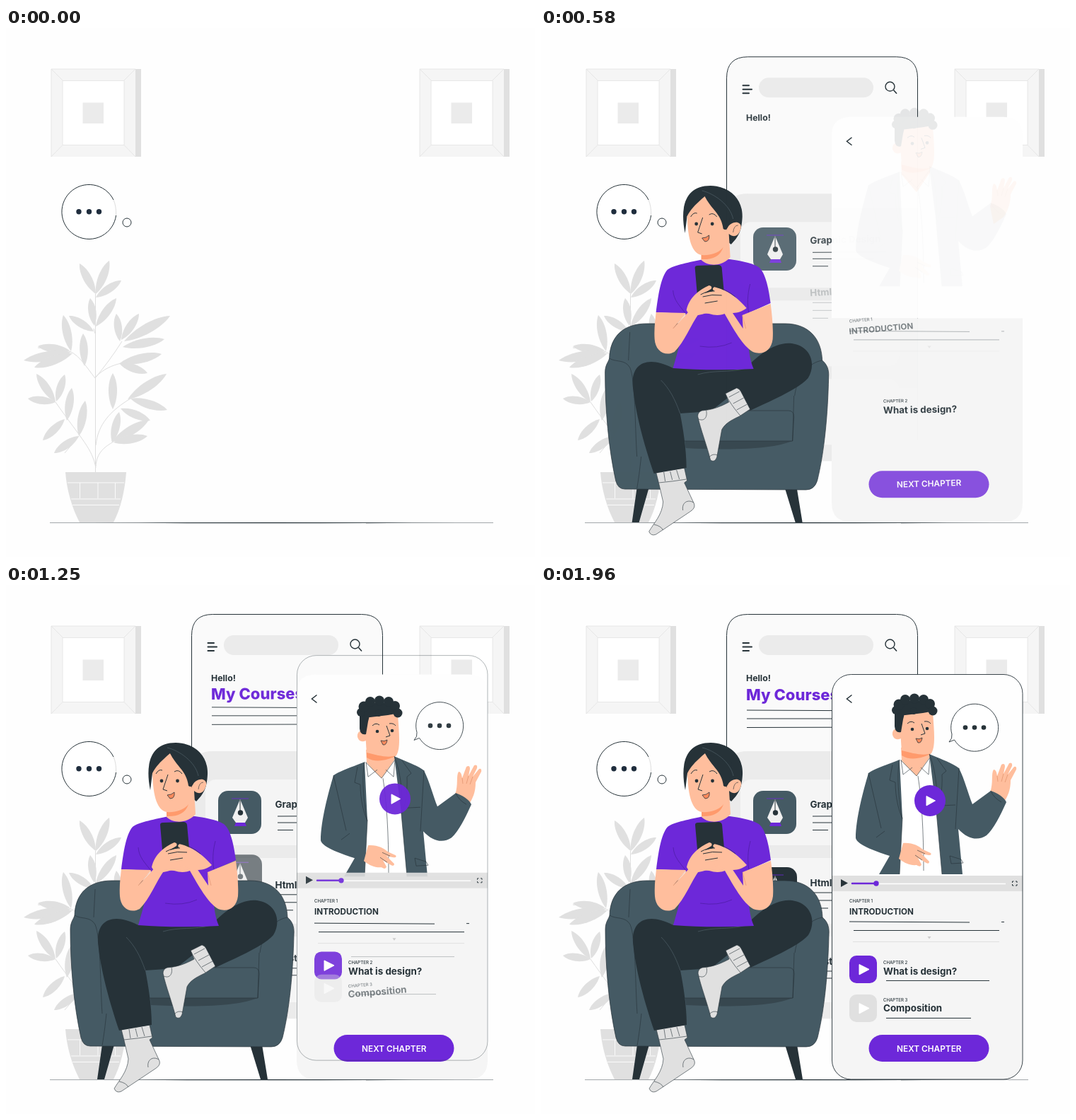
Recreate the animation shown at these times as an HTML page. Size 748x748 px, loop 2 s.

```html
<!DOCTYPE html>
<html lang="en">
<head>
<meta charset="utf-8">
<style>
html,body{margin:0;width:100%;height:100%;overflow:hidden;background:#fefefe}
svg{display:block;width:748px;height:748px}
text{font:700 13.4px Inter,"Open Sans",sans-serif;fill:#263238}
.tag{font-size:6.1px;font-weight:500}
.line{fill:none;stroke:#263238;stroke-width:1}
.thin{fill:none;stroke:#263238;stroke-width:.6}
.dark{fill:#263238}.slate{fill:#455a64}.skin{fill:#ffbe9d}.violet{fill:#6d28d9}.sock{fill:#e0e0e0}
</style>
</head>
<body>
<!-- data-in: delay ms, travel px, opacity power, axis -->
<svg viewBox="0 0 748 748">
<defs>
  <g id="frame">
    <path fill="#f5f5f5" d="M64 58H183V182H64Z"/>
    <path fill="#e0e0e0" d="M183 58H191V182H183Z"/>
    <path fill="none" stroke="#e3e3e3" stroke-width=".8" d="M64 182V58H183M64 58L80 74M183 58L167 74M64 182L80 165.500M183 182L167 165.500"/>
    <path fill="#fff" stroke="#e3e3e3" stroke-width=".8" d="M80 74.500H167V165.500H80Z"/>
    <path fill="#ebebeb" d="M108.500 105.500H138V135H108.500Z"/>
  </g>
  <g id="nib">
    <path fill="#f0f0f0" d="M331 303L342 329L338 336H325L320 329Z"/>
    <path class="line" d="M331 304V320"/>
    <circle class="dark" cx="331.500" cy="322" r="3.700"/>
    <path class="violet" d="M325 336H338L340 341H323Z"/>
    <path stroke="#6d28d9" stroke-width=".8" d="M319 302H343"/>
  </g>
</defs>

<use href="#frame"/><use href="#frame" x="521"/>
<g id="plant" fill="#e0e0e0">
  <path fill="none" stroke="#dedede" d="M126.500 628V376M126 495C114 480 105 464 90 457L45 452M126 495C140 478 152 462 164 443M126 494C138 482 150 477 163 474M126 432L124 425M127 622C122 595 108 583 70 529M127 620C128 600 140 592 152 585M127 590C130 560 148 541 176 524M103 577L83 601"/>
  <path d="M84 628H170C168 655 162 680 152 699H104C94 680 86 655 84 628Z"/>
  <path fill="none" stroke="#fafafa" d="M87 643H167M92 666H162M94 674.500H160M104.500 643V665M130 643V665M154.500 643V665"/>
</g>
<path stroke="#8a8f92" stroke-width=".8" d="M62 699.600H689"/>
<path class="dark" d="M120 699.600Q375 698.400 640 699.600Q375 701 120 699.600"/>

<g data-in="0,90,2">
  <rect x="262.500" y="41.500" width="270" height="572" rx="30" fill="#fafafa"/>
  <path fill="#ebebeb" d="M262.500 262Q264 235 292 235H503Q531 235 532.500 262V583Q532 613 503 613H292Q263 613 262.500 583Z"/>
  <g fill="#f5f5f5">
    <rect x="282" y="275" width="225" height="93" rx="15"/>
    <rect x="282" y="386" width="225" height="93" rx="15"/>
    <rect x="282" y="497" width="225" height="93" rx="15"/>
  </g>
  <path class="line" d="M262.500 583V71.500Q262.500 41.500 292.500 41.500H502.500Q532.500 41.500 532.500 71.500V583"/>
</g>
<g data-in="0,90,1.500">
  <rect x="308" y="71" width="162" height="28" rx="14" fill="#ebebeb"/>
  <path class="line" style="stroke-width:2;stroke-linecap:round" d="M285.500 82H294M285.500 87.500H298M285.500 93H294"/>
  <circle class="line" style="stroke-width:1.400" cx="493.500" cy="83.500" r="6.500"/>
  <path class="line" style="stroke-width:1.600" d="M498.500 88.500L503 93.500"/>
</g>
<g data-in="40,90,1.300"><text x="290" y="136" style="font-size:12.300px">Hello!</text></g>
<g data-in="685,45,1"><text x="290" y="163" style="font-size:22px;font-weight:800;fill:#6d28d9">My Courses</text></g>
<g data-in="740,45,1"><path class="line" d="M291 177L500 178M291 189H500M291 201.500L500 201"/></g>
<g data-in="75,90,1.300">
  <rect class="slate" x="300" y="291" width="61" height="61" rx="14"/><use href="#nib"/>
</g>
<g data-in="80,90,1.500">
  <text x="380.500" y="315">Graphic Design</text>
  <path class="line" d="M384 327L488 326.500M384 336H470M384 346.500H406"/>
</g>
<g data-in="350,60,1">
  <text x="380.500" y="426">Html Basics</text>
  <path class="line" d="M384 435H488M384 446H470M384 457H406"/>
</g>
<g data-in="880,45,1">
  <rect class="dark" x="300" y="399" width="62" height="61" rx="14"/><use href="#nib" y="108"/>
</g>
<g data-in="740,45,1">
  <text x="380.500" y="537">Illustration</text>
  <path class="line" d="M384 546H488M384 556H470"/>
</g>

<g data-in="0,45,1,x">
  <path class="dark" d="M136 650H153L139 699H129ZM345 650H362L370 699H360Z"/>
  <path class="slate" stroke="#263238" stroke-width=".7" d="M91 487C91 476 96 472 97 467C98 435 118 418 150 418H345C380 418 397 440 398 470C404 475 408 482 407 494C406 545 401 600 391 640Q387 653 375 653L119 652Q109 652 106 640C96 595 91 540 91 487Z"/>
  <path class="thin" d="M97 467C106 473 119 468 126 480C134 498 133 560 136 606M398 470C380 473 363 490 359 520M142 606C140 625 138 640 136 651M126 430L124 470"/>
  <path fill="#37474f" d="M204 584H356C330 594 285 598 205 594Z"/>
  <path class="thin" d="M190 584H356M250 541H350Q358 541 358 550L356 584M358 520L356 584"/>
  <path class="sock" stroke="#263238" stroke-width=".6" d="M163 628L203 622L207 640L203 643L217 673Q219 679 211 684L163 716Q156 719 153 712C160 700 172 688 173 670L167 644Z"/>
  <path class="thin" d="M167 643Q188 641 206 638M174 628L176 641M183 627L186 639M192 625L196 638M201 682C199 671 208 666 216 671M160 702Q170 704 173 710"/>
  <path class="dark" d="M187 481C150 462 128 475 130 505C134 550 150 600 160 630L206 622C206 595 201 565 197 545L240 542L263 524L280 513L296 541C330 525 365 510 378 495C390 475 382 450 355 446C330 443 305 465 290 481Z"/>
  <path class="sock" stroke="#263238" stroke-width=".6" d="M261 517L277 509Q281 510 283 514L296 539L281 549C268 555 260 560 256 568L249 607Q246 615 240 611C235 590 226 568 222 549Q222 543 228 541C243 540 255 535 266 529Z"/>
  <path class="thin" d="M261 517Q268 532 282 548M266 522L281 514M272 531L287 523M277 540L292 532M223 553C232 557 236 549 234 541M238 607Q243 601 250 604"/>
  <path class="thin" style="stroke:#55656d" d="M197 545C190 525 182 510 170 498M290 481C266 488 245 483 222 490"/>
  <path class="violet" d="M230 327C212 331 188 335 179 342C170 352 166 378 163 402L205 404C202 430 193 460 187 481Q240 485 301 482C292 462 292 428 294 403L325 389C322 365 317 345 308 338C296 331 280 329 267 327Z"/>
  <path class="thin" style="stroke:#461a96" d="M187 371C188 385 196 392 205 404M296 362C292 378 292 390 294 403M225 450Q250 454 270 445"/>
  <path class="skin" d="M163 402L205 403L187 425L228 381Q245 372 258 383L286 425L285 406L325 390C327 405 329 425 328 440C326 457 313 463 300 458C286 450 272 425 260 404Q250 408 238 404L224 403C212 420 203 444 189 458C176 465 162 457 161 440C160 425 162 412 163 402Z"/>
  <path class="thin" style="stroke:#e08f68" d="M187 425L205 404M290 425L285 406"/>
  <path class="dark" d="M218 339Q218 336 222 336L251 335Q255 335 256 339L260 383L222 386Z"/>
  <path class="skin" d="M206 399C210 381 224 370 238 364Q243 365 241 369L231 375L251 371Q258 371 255 376L240 382L255 379Q261 380 257 384L242 390L252 388Q258 389 254 393C244 401 226 407 211 407Z"/>
  <path class="skin" d="M291 396C278 381 264 371 246 366Q241 368 245 372L236 374Q232 377 239 380L236 383Q234 388 243 389L241 392Q242 396 250 397C264 404 279 406 291 396Z"/>
  <path class="line" d="M226 377Q237 371 246 372M229 380Q242 376 256 378M232 389L250 386"/>
  <path class="thin" d="M246 366Q262 369 275 380"/>
  <path class="dark" d="M204 290C196 250 206 223 240 223C270 224 286 244 285 268C284 288 279 296 269 306L262 300V262L207 266Z"/>
  <path class="skin" d="M207 266C213 254 224 245 232 238C241 252 252 260 262 266V287C266 272 285 271 283 283C280 295 273 297 266 291L268 324C256 338 236 337 227 328V321C214 318 208 300 207 266Z"/>
  <path fill="#ff9a6c" d="M227 321C240 322 252 318 258 310C254 322 244 328 227 327Z"/>
  <path class="dark" d="M232 238C242 258 255 262 258 284Q263 288 266 278L270 250Z"/>
  <path class="thin" style="stroke:#55656d" d="M228 230C245 234 268 250 272 270"/>
  <path class="thin" d="M272 289Q273 279 279 279"/>
  <circle class="dark" cx="220" cy="277" r="2.400"/><circle class="dark" cx="242.500" cy="277" r="2.400"/>
  <path class="line" d="M212 267Q216 260 221 262M238 264Q244 260 249 267M229 268L222 289L228 291"/>
  <path fill="#ff8a5c" stroke="#263238" stroke-width=".8" d="M228 297Q234 297 238 293Q239 302 232 302Z"/>
</g>

<g data-in="0,90,2">
  <path fill="#f5f5f5" d="M411 411H681V672Q681 699 654 699H438Q411 699 411 672Z"/>
  <path fill="#fefefe" d="M411 411V153Q411 126.500 438 126.500H654Q681 126.500 681 153V411Z"/>
</g>
<g data-in="0,90,1"><path class="line" style="stroke-width:1.500" d="M439.500 155.500L432.500 161L439.500 166.500"/></g>

<g data-in="420,45,1">
  <path class="skin" d="M635 293C640 280 636 267 640 261Q644 261 645 270L651 254Q656 251 656 257L654 267L662 252Q667 250 666 256L660 268L669 257Q673 256 672 261L664 276C664 290 660 299 654 308L640 318Z"/>
  <path class="thin" style="stroke:#d98862" d="M645 270L646 278M654 267L651 278M660 268L656 279"/>
  <path class="skin" d="M509 230L510 248L531 273L550 245L550 225Z"/>
  <path class="skin" d="M507 190L510 236C518 245 543 244 552 238C558 228 556 208 554 180L508 178Z"/>
  <path class="skin" d="M509 206C503 200 496 204 497 212Q500 221 509 217Z"/>
  <path fill="#ff9a6c" d="M510 234C526 238 540 242 552 238C540 245 522 249 510 241Z"/>
  <g class="dark">
    <path d="M500 178H515L512 190L509 208Q501 210 500 200Z"/>
    <path d="M503 184L505 164L550 163L557 178L540 181L515 184Z"/>
    <circle cx="502" cy="177" r="6"/><circle cx="506" cy="169" r="7.500"/><circle cx="515" cy="162" r="7"/><circle cx="528" cy="160.500" r="7"/>
    <circle cx="541" cy="162" r="7"/><circle cx="550" cy="168" r="7"/><circle cx="554" cy="178" r="6.500"/><circle cx="527" cy="178" r="5"/>
    <circle cx="525" cy="204" r="2.300"/><circle cx="546" cy="203" r="2.300"/>
  </g>
  <path class="line" d="M518 196Q523 191 528 195M542 193Q548 192 551 196M538 196L543 210L537 212"/>
  <path fill="#ff8a5c" stroke="#263238" stroke-width=".8" d="M530 217Q535 219 539 216Q538 224 533 223Z"/>
</g>
<g data-in="490,45,1">
  <path fill="#fff" d="M508 247L531 270L550 243L560 300L568 409H507L500 300Z"/>
  <path class="thin" d="M533 270Q541 320 541 404M509 247L512 268L525 258M550 244L548 268L537 258M509 248L531 270L550 244"/>
  <path class="slate" d="M507 247C492 253 471 260 463 266C456 290 445 330 445 358C447 368 478 378 493 383L478 409H507L511 330Z"/>
  <path class="slate" d="M549 239C563 245 582 252 591 259C599 275 604 295 610 310L636 291C645 294 655 300 658 307C650 325 640 345 630 354C618 362 604 360 590 345L596 409H567L559 320Z"/>
  <path class="thin" d="M507 247C502 270 507 315 511 330L507 409M497 254L493 276L501 279C501 300 506 320 511 330M549 239C560 265 561 300 559 320L567 409M560 245L573 263L567 268C568 290 564 310 559 320M463 266L481 344M486 348L474 357M591 259L586 345M566 312L586 311M636 291Q640 301 651 307M578 383L594 388L597 393L580 394Z"/>
  <path class="skin" d="M512 365C525 364 534 369 540 374L551 379Q553 382 548 382L538 380L549 391Q549 396 543 392L533 386L538 395Q537 400 531 396C521 397 512 392 506 387Z"/>
  <path class="thin" d="M532 375L543 380M529 382L539 389"/>
</g>

<g data-in="740,45,1">
  <path fill="#e0e0e0" d="M411 411H681V433H411Z"/>
  <path class="dark" d="M424 416L434 421.500L424 427Z"/>
  <path stroke="#fff" stroke-width="1.500" d="M474 422.500H657"/>
  <path stroke="#6d28d9" stroke-width="2.500" stroke-linecap="round" d="M440 422H474"/>
  <circle class="violet" cx="474" cy="422" r="3.700"/>
  <path class="line" d="M668.500 419H666.500V421M671 419H673V421M668.500 425H666.500V423M671 425H673V423"/>
</g>
<g data-in="715,45,1">
  <circle class="violet" cx="550" cy="305" r="22"/>
  <path fill="#fff" stroke="#fff" stroke-linejoin="round" d="M545 298.500L557.500 305L545 312Z"/>
  <path fill="#fff" stroke="#263238" stroke-width=".9" d="M584.500 219L577 222Q582 217 581 211A33.500 33.500 0 1 1 584.500 219Z"/>
  <g class="dark"><circle cx="600" cy="201.500" r="3.300"/><circle cx="613" cy="201.500" r="3.300"/><circle cx="626" cy="201.500" r="3.300"/></g>
</g>

<g data-in="260,60,.7">
  <text class="tag" x="436" y="449">CHAPTER 1</text>
  <text x="436" y="465.500" style="font-size:11.650px">INTRODUCTION</text>
</g>
<g data-in="310,70,1">
  <path class="line" d="M436 476L606 477M651 476.500H655M442 488.500H648"/>
  <path fill="none" stroke="#e0e0e0" d="M441 504.500H648"/>
  <path fill="#ccc" d="M546.500 497H551.500L549 500.500Z"/>
</g>
<g data-in="50,90,1.300">
  <text class="tag" x="484" y="535.500">CHAPTER 2</text>
  <text x="484" y="551">What is design?</text>
</g>
<g data-in="760,45,1">
  <rect class="violet" x="436" y="524" width="39" height="39" rx="10"/>
  <path fill="#fff" stroke="#fff" stroke-linejoin="round" d="M450 536.500L464 543.500L450 551Z"/>
</g>
<g data-in="890,45,1">
  <text class="tag" x="484" y="588.500">CHAPTER 3</text>
  <text x="484" y="602.500">Composition</text>
</g>
<g data-in="960,45,1">
  <rect fill="#e0e0e0" x="436" y="579" width="39" height="39" rx="10"/>
  <path fill="#fff" stroke="#fff" stroke-linejoin="round" d="M450 591.500L464 598.500L450 606Z"/>
</g>
<g data-in="1000,45,1"><path class="line" d="M488 558.500H634M488 611.500H608"/></g>
<g data-in="80,90,2">
  <rect class="violet" x="463.500" y="636" width="170" height="38" rx="19"/>
  <text x="503" y="659.500" style="font-size:11.850px;font-weight:600;fill:#fff">NEXT CHAPTER</text>
</g>
<g data-in="950,45,1"><rect class="line" style="stroke-width:.9" x="411.500" y="126.500" width="269.500" height="572.500" rx="27"/></g>

<circle cx="117.500" cy="260" r="38.500" fill="#fff"/>
<path class="line" d="M155.600 265A38.500 38.500 0 1 1 152 243"/>
<path class="line" style="stroke:#ddd" d="M152 243Q156 252 155.600 265"/>
<circle class="line" cx="171" cy="275" r="6"/>
<g fill="#1f2d3d"><circle cx="103" cy="259.800" r="3.700"/><circle cx="117.500" cy="259.800" r="3.700"/><circle cx="131.500" cy="259.800" r="3.700"/></g>
</svg>
<script>
const LOOP = 2000, SLIDE = 1000;

// Leaves: base x, base y, tip x, tip y
const leaves = [
  '127 376 104 333,127 376 146 329,127 381 163 357,125 421 119 382,127 422 156 382,124 429 89 407',
  '92 457 81 406,90 456 45 450,92 458 25 470,94 460 40 480,111 478 109 432,161 443 156 404',
  '163 441 188 404,167 443 232 407,165 451 224 440,161 474 220 461,160 474 200 488,70 529 43 489',
  '71 528 83 490,70 529 31 524,86 555 93 509,83 553 52 583,103 577 112 527,103 577 68 601',
  '151 539 151 488,172 525 227 489,176 524 228 540,162 538 204 555,150 586 160 543,150 585 202 554,152 586 200 577'
].join().split(',').map(leaf => {
  const [x, y, X, Y] = leaf.split(' ').map(Number);
  const dx = X - x, dy = Y - y, len = Math.hypot(dx, dy);
  const width = 5 + len * .06, nx = -dy / len * width, ny = dx / len * width;
  const at = (f, k) => `${x + dx * f + nx * k} ${y + dy * f + ny * k}`;
  return `<path d="M${x} ${y}C${at(.3, 1)} ${at(.75, 1)} ${X} ${Y}C${at(.75, -1)} ${at(.3, -1)} ${x} ${y}"/>`;
});
document.getElementById('plant').insertAdjacentHTML('beforeend', leaves.join(''));

const clamp = v => Math.min(1, Math.max(0, v));

// cubic-bezier(.4, 0, .3, 1.4)
function ease(x) {
  if (x <= 0 || x >= 1) return clamp(x);
  const curve = (s, a, b) => 3 * (1 - s) ** 2 * s * a + 3 * (1 - s) * s * s * b + s ** 3;
  let lo = 0, hi = 1;
  for (let i = 0; i < 24; i++) {
    const mid = (lo + hi) / 2;
    if (curve(mid, .4, .3) < x) lo = mid; else hi = mid;
  }
  return curve(lo, 0, 1.4);
}

const parts = [...document.querySelectorAll('[data-in]')].map(el => {
  const [delay, travel, power, axis] = el.dataset.in.split(',');
  return { el, delay: +delay, travel: +travel, power: +power, axis, texts: [...el.querySelectorAll('text')] };
});

function draw(now) {
  const t = now % LOOP;
  for (const { el, delay, travel, power, axis, texts } of parts) {
    const p = ease((t - delay) / SLIDE), shift = (p - 1) * travel;
    el.setAttribute('transform', axis ? `translate(${shift} 0)` : `translate(0 ${shift})`);
    el.setAttribute('opacity', clamp(p) ** power);
    const tilt = -5 * Math.sin(Math.PI * clamp(p));
    for (const text of texts)
      text.setAttribute('transform', `rotate(${tilt} ${text.getAttribute('x')} ${text.getAttribute('y')})`);
  }
}

const start = performance.now();
function tick() {
  draw(performance.now() - start);
  requestAnimationFrame(tick);
}
tick();
</script>
</body>
</html>
```
